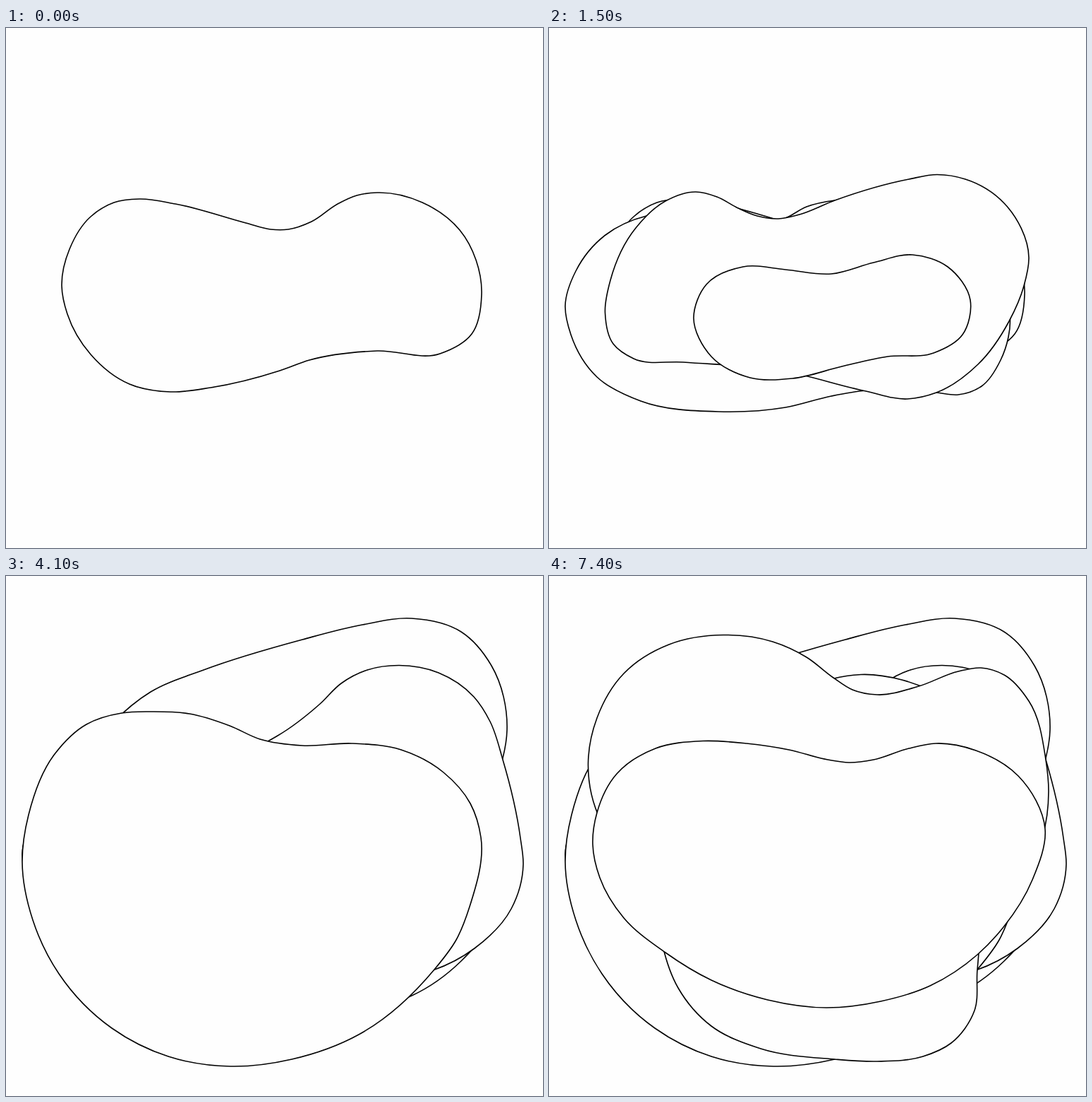
Recreate the animation shown at these times as an HTML page. Size 761 by 736 pixels, loop 8 s.

```html
<!DOCTYPE html>
<html lang="en">
<head>
<meta charset="utf-8">
<title>Stacked blobs</title>
<style>
  html, body { margin: 0; width: 100%; height: 100%; overflow: hidden; background: #fefefe; }
  svg { display: block; width: 100%; height: 100%; }
  path { fill: #fefefe; stroke: #000; stroke-width: 1.6; stroke-linejoin: round; }
</style>
</head>
<body>
<svg id="stage" viewBox="0 0 761 736"></svg>
<script>
const LOOP = 8000;
const stage = document.getElementById('stage');
const blobs = [];

// Smooth closed curve through the points, tangents weighted by chord length.
function closedCurve(pts) {
  const n = pts.length;
  const at = i => pts[(i + n) % n];
  const chord = i => Math.hypot(at(i + 1)[0] - at(i)[0], at(i + 1)[1] - at(i)[1]);
  const tangent = i => {
    const before = chord(i - 1), after = chord(i);
    return [0, 1].map(k => {
      const slopeIn = (at(i)[k] - at(i - 1)[k]) / before;
      const slopeOut = (at(i + 1)[k] - at(i)[k]) / after;
      return (slopeIn * after + slopeOut * before) / (before + after);
    });
  };
  let d = 'M' + pts[0];
  for (let i = 0; i < n; i++) {
    const h = chord(i) / 3, p = at(i), q = at(i + 1);
    const a = tangent(i), b = tangent((i + 1) % n);
    const c1 = [p[0] + a[0] * h, p[1] + a[1] * h];
    const c2 = [q[0] - b[0] * h, q[1] - b[1] * h];
    d += 'C' + [c1, c2, q].map(c => c.map(v => v.toFixed(2))).join(' ');
  }
  return d + 'Z';
}

function blob(start, points) {
  const el = document.createElementNS('http://www.w3.org/2000/svg', 'path');
  el.setAttribute('d', closedCurve(points.split(' ').map(p => p.split(',').map(Number))));
  stage.appendChild(el);
  blobs.push({ start, el });
}

blob(0, '79,365 90,313 120,267 153,247 189,242 240,249 340,276 375,285 400,285 433,274 ' +
  '470,249 497,237 526,233 590,247 643,286 674,377 660,433 615,461 526,457 430,470 ' +
  '388,485 290,509 233,515 175,504 120,462 87,405');

blob(100, '23,393 38,344 80,293 138,266 210,263 265,271 303,276 333,270 365,253 405,244 ' +
  '440,242 500,254 560,285 615,333 653,405 640,470 613,507 580,519 549,516 500,512 ' +
  '449,513 400,521 335,537 240,543 130,528 68,494 31,434');

blob(900, '79.5,403 87,357 123,283 165,245 208,232 238,239 268,255 295,266 325,270 355,264 ' +
  '405,244 510,214 550,207.5 590,214 645,248 680,325 673,365 652,415 608,476 549,516 ' +
  '508,525 449,514 330,485 190,473 120,468 91,447');

blob(1500, '205,410 223,363 275,338 335,342 400,348 460,332 515,321 565,338 597,385 ' +
  '586,434 545,460 480,465 415,479 345,496 285,495 230,465');

blob(2600, '85,335 99,278 150,209 205,164 280,133 420,90 505,69 575,60 645,79 688,127 ' +
  '710,218 700,272 684,312 678,355 684,390 696,448 680,503 645,545 575,594 490,616 ' +
  '320,621 205,611 150,573 138,530 123,468 105,410 87,355');

blob(3400, '56,433 62,382 85,335 151,273 195,250 237,242 270,247 306,253 345,246 385,226 ' +
  '445,181 475,152 512,133 557,126.5 613,137 663,171 686,206 704,260 729,371 733,408 ' +
  '716,471 664,527 605,558 545,570 490,564 425,555 360,561 295,578 220,583 150,574 ' +
  '98,544 67,497');

blob(4100, '23,405 32,338 69,252 114,210 164,194 203,192 260,195 317,212 360,231 420,240 ' +
  '490,237 560,246 620,278 658,322 673,370 657,468 638,515 607,557 500,649 405,684 ' +
  '318,694 230,680 150,640 75,563 38,487');

blob(4700, '154,463 160,418 175,382 200,353 243,327 268,300 290,259 317,212 365,161 442,139.5 ' +
  '500,147 570,178 646,247 678,317 672,368 645,410 621,461 607,557 603,615 570,661 ' +
  '530,680 465,687 405,684 300,669 230,637 183,583 161,523');

blob(5500, '55.5,265 68,201 106,138 170,97 247,83.5 317,93 365,115 403,144 430,161 465,168 ' +
  '524,156 580,135 612,130 645,140 680,177 704,260 708,305 699,370 664,438 617,481 ' +
  '560,508 510,516.5 460,508 330,463 240,439 158,423 118,406 74,348');

blob(7400, '62,380 68,335 96,280 151,244 218,233.5 280,237 340,246 395,260 425,264 460,260 ' +
  '510,244 548,237 605,247 665,283 703,358 685,430 644,497 607,536 540,580 470,602 ' +
  '393,611 310,600 230,572 165,533 106,484 72,427');

function draw(t) {
  for (const { start, el } of blobs) el.style.display = t >= start ? '' : 'none';
}

const origin = performance.now();
function tick() {
  draw((performance.now() - origin) % LOOP);
  requestAnimationFrame(tick);
}
draw(0);
requestAnimationFrame(tick);
</script>
</body>
</html>
```
